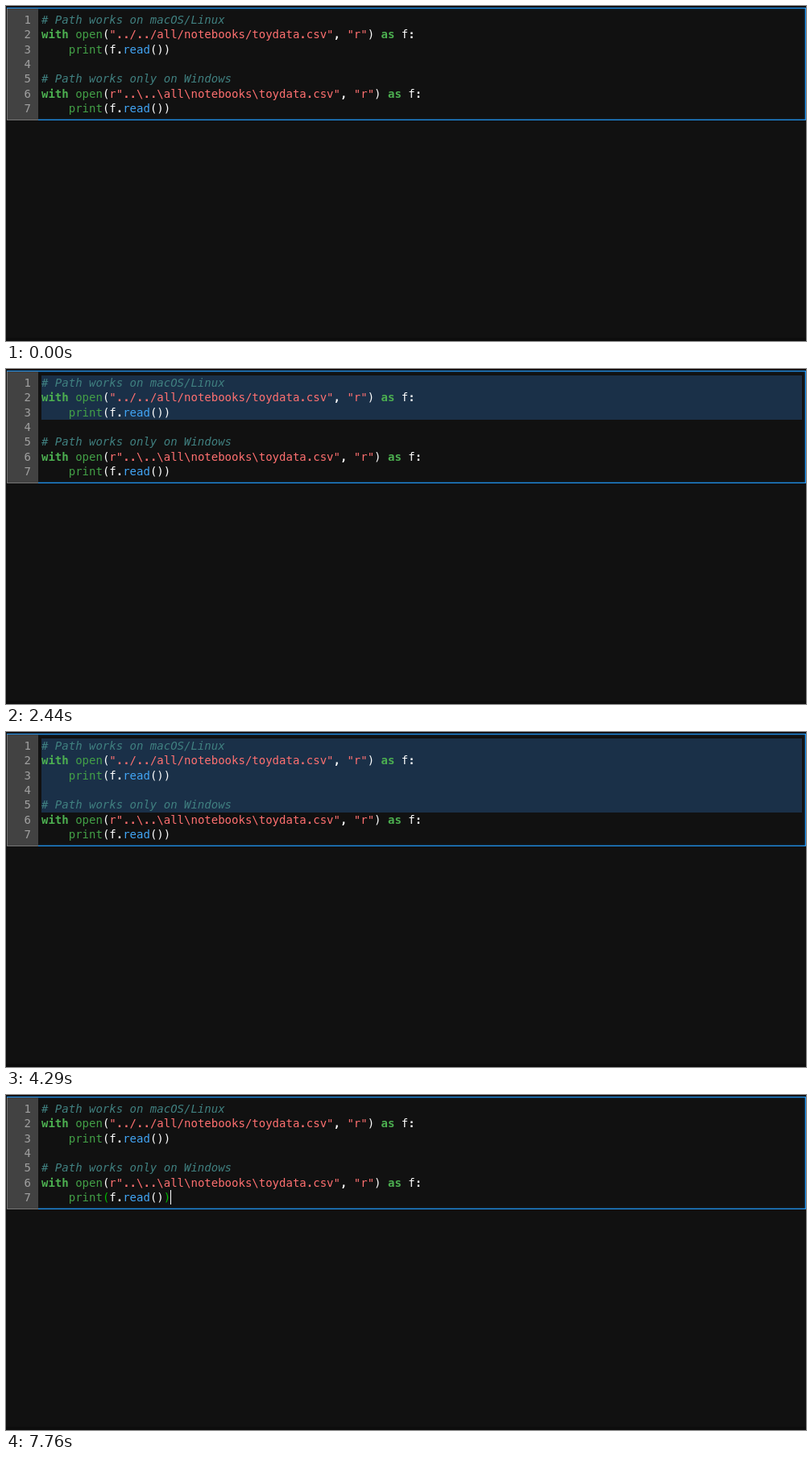
Animation, 993 px wide and 416 px high, one loop 8 s. Source, as an HTML page:

```html
<!DOCTYPE html>
<html lang="en">
<head>
<meta charset="utf-8">
<title>Code cell selection</title>
<style>
  html, body { margin: 0; width: 100%; height: 100%; overflow: hidden; background: #111; }
  #stage { position: relative; width: 993px; height: 416px; overflow: hidden; background: #111; }
  #stage > * { position: absolute; box-sizing: border-box; margin: 0; }

  .cell { left: 1px; top: 2px; width: 992px; height: 140px;
          border: 1px solid #2196f3; box-shadow: inset 0 0 2px #2196f3; }
  .gutter { left: 1px; top: 3px; width: 39px; height: 139px; background: #424242;
            border: solid #757575; border-width: 0 0 1px 1px; }
  .floor { left: 0; top: 412px; width: 993px; height: 4px; background: #0d0d0d; }

  pre { top: 8px; font: 14px/18.31px "DejaVu Sans Mono", monospace; color: #fff; }
  .numbers { left: 22.6px; color: #a0a0a0; }
  .code { left: 44px; }
  .code i { color: #408080; }
  .key { color: #4caf50; font-weight: bold; }
  .fn { color: #43a047; }
  .str { color: #ff7070; }
  .prop { color: #42a5f5; }

  .rows, .tail { left: 44px; background: #1a3048; }
  .rows { top: 8px; width: 944px; animation: grow 8s step-end infinite; }
  .tail { top: 118px; width: 160px; height: 18px; animation: tail 8s step-end infinite; }
  .caret { width: 1px; height: 18px; background: #fff; animation: caret 8s step-end infinite; }
  .match { animation: match 8s step-end infinite; }

  @keyframes grow {
    0% { height: 0; }
    8.125% { height: 18px; }
    18.5% { height: 37px; }
    30.5% { height: 55px; }
    45.5% { height: 73px; }
    53.625% { height: 92px; }
    71.625% { height: 110px; }
    97%, 100% { height: 0; }
  }
  @keyframes tail {
    0% { opacity: 0; }
    83.5% { opacity: 1; }
    97%, 100% { opacity: 0; }
  }
  @keyframes caret {
    0% { left: 44px; top: 8px; opacity: 0; }
    1.375% { left: 44px; top: 8px; opacity: 1; }
    8.125% { left: 44px; top: 8px; opacity: 0; }
    97%, 100% { left: 204px; top: 118px; opacity: 1; }
  }
  @keyframes match {
    0% { color: #fff; }
    97%, 100% { color: #0b0; }
  }
</style>
</head>
<body>
<div id="stage">
  <div class="cell"></div>
  <div class="gutter"></div>
  <div class="floor"></div>
  <div class="rows"></div>
  <div class="tail"></div>
<pre class="numbers">1
2
3
4
5
6
7</pre>
<pre class="code"><i># Path works on macOS/Linux</i>
<span class="key">with</span> <span class="fn">open</span>(<span class="str">"<b>..</b>/<b>..</b>/all/notebooks/toydata<b>.</b>csv"</span><b>,</b> <span class="str">"r"</span>) <span class="key">as</span> f<b>:</b>
    <span class="fn">print</span>(f<b>.</b><span class="prop">read</span>())

<i># Path works only on Windows</i>
<span class="key">with</span> <span class="fn">open</span>(<span class="str">r"<b>..</b>\<b>..</b>\all\notebooks\toydata<b>.</b>csv"</span><b>,</b> <span class="str">"r"</span>) <span class="key">as</span> f<b>:</b>
    <span class="fn">print</span><span class="match">(</span>f<b>.</b><span class="prop">read</span>()<span class="match">)</span></pre>
  <div class="caret"></div>
</div>
</body>
</html>
```
